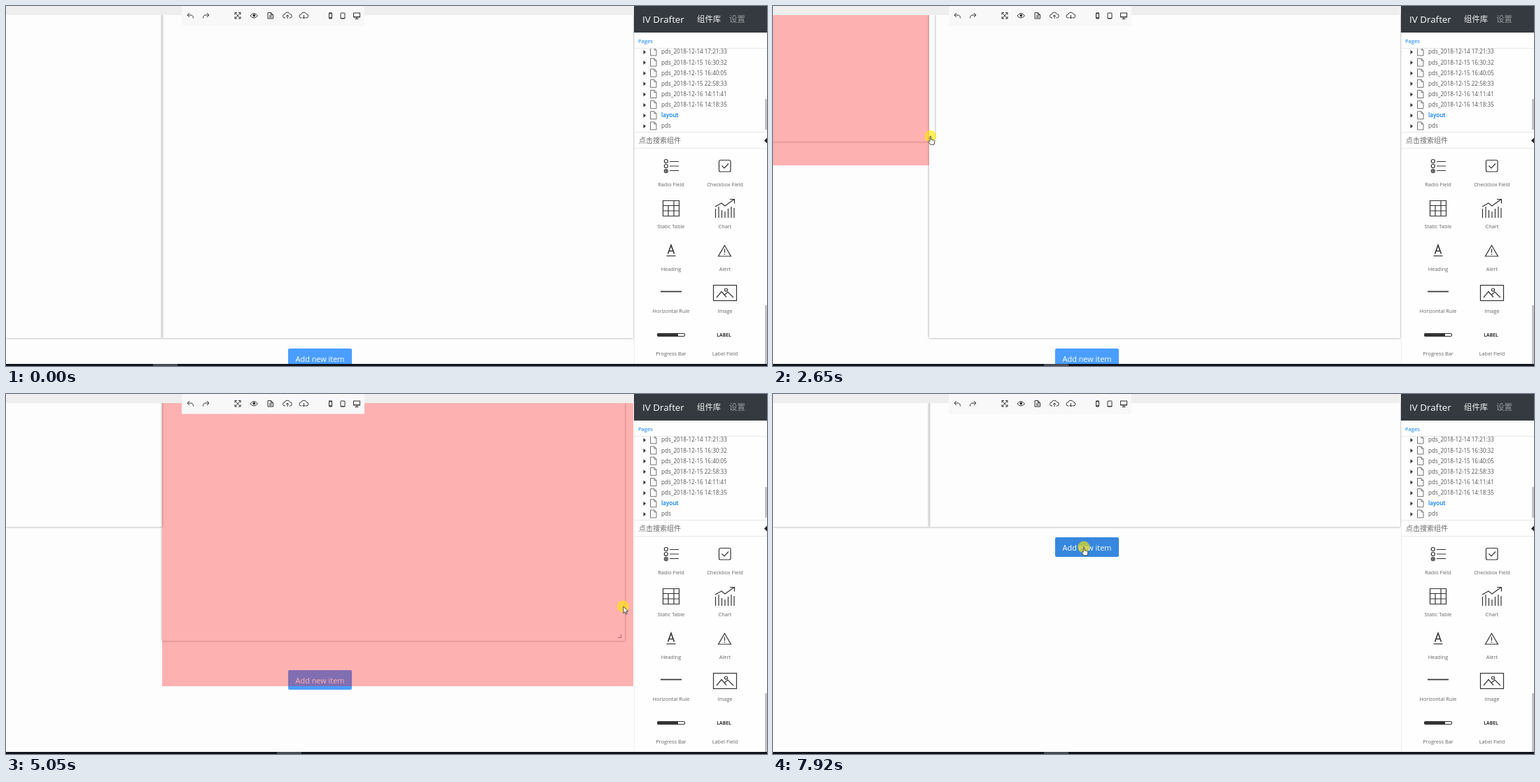
An HTML page for the animation above (7990 ms loop, 1087 by 515 pixels).

```html
<!DOCTYPE html>
<html lang="en">
<head>
<meta charset="utf-8">
<title>Page layout editor</title>
<style>
html, body { margin: 0; width: 100%; height: 100%; overflow: hidden; background: #fdfdfd; }
body { position: relative; font-family: "Open Sans", "Noto Sans CJK SC", "Noto Sans CJK", sans-serif; }
svg { position: absolute; left: 0; top: 0; }
#strip { position: absolute; width: 897px; height: 13px; background: #eee; }
#work { position: absolute; top: 13px; width: 897px; height: 499px; overflow: hidden; }
#work div { position: absolute; top: 0; box-sizing: border-box; }
#work .panel { top: -6px; box-shadow: 0 0 3px rgba(0,0,0,.42); }
#work .grip::after { content: ""; position: absolute; right: 5px; bottom: 4px; width: 5px; height: 5px;
  box-sizing: border-box; border: solid rgba(0,0,0,.45); border-width: 0 1px 1px 0; }
#left { left: 0; }
#right, #ghost { left: 223px; }
#work #button { left: 403px; width: 91px; height: 28.5px; border-radius: 2px; background: #4a9eff;
  color: #fff; font-size: 10.9px; line-height: 29px; text-align: center; white-space: nowrap; }
#work #ghost { background: rgba(255,0,0,.3); }
.line { fill: none; stroke: #343434; stroke-width: 1.2; }
.tool { fill: none; stroke: #333; stroke-width: 1; }
.cap { font-size: 7.4px; fill: #666; text-anchor: middle; }
.row { font-size: 8.1px; fill: #555; }
</style>
</head>
<body>
<div id="strip"></div>
<div id="work">
  <div id="left" class="panel"></div>
  <div id="right" class="panel"></div>
  <div id="button">Add new item</div>
  <div id="ghost"></div>
</div>

<svg width="1087" height="515">
  <rect x="251" width="261" height="28.5" fill="#f8f8f8"/>
  <g class="tool">
    <path d="M262 10l-3 3 3 3M259 13h5q3.500 0 3.500 4.500"/>
    <path d="M287 10l3 3-3 3M290 13h-5q-3.500 0-3.500 4.500"/>
    <path d="M327 12.500v-3h3M332 9.500h3v3M335 15v3h-3M330 18h-3v-3M327 9.500l8 8.500M335 9.500l-8 8.500"/>
    <path d="M349 14q5-7 10.500 0q-5.500 6-10.500 0z"/><circle cx="354.300" cy="13.500" r="1.500" fill="#333"/>
    <path d="M374 9.500h4.500l3 3v5.500h-7.500zM378.500 9.500v3h3M375.800 14h4M375.800 16h4"/>
    <g id="cloud"><path d="M399 17h-1a2.500 2.500 0 0 1 0-5a4 4 0 0 1 7.500-.5a2.700 2.700 0 0 1 0 5.500h-1"/></g>
    <use href="#cloud" x="23.500"/>
    <path d="M402 18v-5M400 15l2-2 2 2M425.500 13v5M423.500 16l2 2 2-2"/>
    <rect x="461.500" y="10" width="4" height="8" rx=".5"/><path d="M461 10.500h5M461 17h5" stroke-width="1.500"/>
    <rect x="478" y="10" width="6" height="8" rx=".5"/><path d="M478 17.500h6"/>
    <rect x="496.500" y="10" width="9" height="6"/><path d="M496 15.500h10M501 16v2.500M498.500 18.500h5"/>
  </g>

  <rect x="897" width="190" height="512" fill="#fefefe"/>
  <path d="M897.5 38V512" stroke="#eee"/>
  <rect x="897" width="190" height="38" fill="#343a40"/>
  <text x="909" y="24" font-size="13.400" fill="#fff">IV Drafter</text>
  <text x="987" y="23" font-size="11.400" fill="#f2f2f2">组件库</text>
  <text x="1033" y="23" font-size="11.400" fill="#999c9f">设置</text>
  <text x="903" y="53" font-size="7.600" fill="#007bff">Pages</text>
  <clipPath id="treeClip"><rect x="897" y="61" width="190" height="119"/></clipPath>
  <g id="tree" clip-path="url(#treeClip)"></g>
  <path d="M897 60.500h190M897 180.500h190M897 203.500h190" stroke="#e8e8e8"/>
  <text x="904" y="196" font-size="10" fill="#6a6a6a">点击搜索组件</text>
  <path d="M1083 192.500l4-4v8z" fill="#222"/>
  <path d="M1084 133h3v44h-3zM1084 428h3v84h-3z" fill="#c4c4c4"/>

  <g id="captions"></g>
  <g class="line">
    <path d="M948 222.500h13M948 229h13M948 235.500h13"/>
    <circle cx="942.800" cy="222" r="2.500"/><circle cx="942.800" cy="229" r="2.500"/><circle cx="942.800" cy="236" r="2.500"/>
    <circle cx="942.800" cy="236" r=".8"/>
    <rect x="1018.500" y="220.500" width="16.500" height="16.500" rx="2"/><path d="M1022.500 228.500l3.500 3.500 6-6.500"/>
    <path d="M938.500 278.500h23v22h-23zM938.500 285.500h23M938.500 293h23M946 285.500v15M954 278.500v22"/>
    <path d="M1013.500 303v-13M1018 303v-16M1022.500 303v-11M1027 303v-9M1031.500 303v-13M1036 303v-16M1040 303v-14"/>
    <path d="M1013 287l9-5 5 4 13-9.500M1034 276.500h6.500v6"/>
    <path d="M945.500 354.500l4.500-12.500 4.500 12.500M947 350.500h6" stroke-width="1.600"/><path d="M943.500 357.500h13"/>
    <path d="M1026.500 342.500l9 15.500h-18zM1026.500 347.500v5.500M1026.500 354.500v1.500"/>
    <path d="M935 408.500h30" stroke-width="1.700"/>
    <rect x="1010.500" y="399.500" width="33" height="22"/>
    <path d="M1015 417l7-8.500 7 8M1026 413.500l5-4.500 8 8"/><circle cx="1028.500" cy="406" r="2"/>
    <rect x="930.500" y="468.500" width="39" height="4" rx="1.500"/>
  </g>
  <path d="M931 468.500h29v4h-29z" fill="#343434"/>
  <text x="1025.500" y="473" font-size="6.700" font-weight="700" fill="#333" text-anchor="middle">LABEL</text>

  <rect y="512" width="1087" height="3" fill="#11141c"/>
  <rect id="task" y="512" width="35" height="3" fill="#474b52"/>

  <g id="pointer">
    <circle id="dot" r="8.500" fill="#ffe900" fill-opacity=".62"/>
    <g fill="#fff" stroke="#222" stroke-width=".8" stroke-linejoin="round">
      <path id="arrow" d="M.5 0v9.500l2.200-2 1.500 3.400 1.600-.7-1.500-3.300h3z"/>
      <path id="hand" d="M-.8 .8q.8-1.300 1.700 0v4l4 1q1.300.4 1 2l-.7 4.200h-5l-3.500-4.200q.5-1.500 2.500-.2z"/>
      <path id="resize" d="M-5-5h4l-1.300 1.300 5 5 1.300-1.300v4h-4l1.300-1.300-5-5-1.300 1.300z"/>
    </g>
  </g>
</svg>

<script>
const $ = id => document.getElementById(id);
const LOOP = 7990, START = 190, STEP = 78;
const ROW = 19, SHORT = 190, TALL = 475, SPLIT = 223, EDGE = 896;

const rows = ["pds_2018-12-14 17:21:33", "pds_2018-12-15 16:30:32", "pds_2018-12-15 16:40:05",
  "pds_2018-12-15 22:58:33", "pds_2018-12-16 14:11:41", "pds_2018-12-16 14:18:35", "layout", "pds"];
$("tree").innerHTML = rows.map((name, i) => {
  const style = name === "layout" ? 'style="fill:#007bff;font-weight:600"' : "";
  return `<g transform="translate(0 ${65.4 + i * 15.15})">
    <path d="M910.500 -2.500l3.500 3-3.500 3z" fill="#333"/>
    <path d="M920.500 -5.500h5.500l3 3v8h-8.500zM926 -5.500v3h3" fill="none" stroke="#666" stroke-width=".9"/>
    <text class="row" x="936" y="3" ${style}>${name}</text></g>`;
}).join("");

const captions = ["Radio Field", "Checkbox Field", "Static Table", "Chart", "Heading", "Alert",
  "Horizontal Rule", "Image", "Progress Bar", "Label Field"];
$("captions").innerHTML = captions.map((name, i) =>
  `<text class="cap" x="${i % 2 ? 1027 : 950}" y="${258 + (i >> 1) * 60.4}">${name}</text>`).join("");

// Pointer path: step, x, y
const path = [
  [0, 958, 498], [3, 600, 486], [6, 166, 470], [10, 215, 467], [13, 217, 468], [18, 217, 468],
  [20, 222, 452], [21, 225, 435], [22, 226, 415], [23, 228, 386], [24, 228, 341],
  [27, 227, 240], [30, 225, 187], [37, 224, 182], [38, 250, 200], [42, 838, 499],
  [49, 895, 472], [55, 896, 472], [56, 894, 463], [57, 893, 455], [58, 891, 440],
  [61, 884, 350], [64, 876, 212], [65, 875, 196], [66, 874, 181], [67, 873, 173],
  [73, 873, 174], [80, 867, 178], [83, 867, 178], [85, 867, 184], [89, 866, 184],
  [92, 700, 262], [95, 520, 260], [97, 446, 223], [99, 444, 219]
];

function pointer(n) {
  const i = path.findIndex(p => p[0] >= n);
  if (i < 1) return (i ? path[path.length - 1] : path[0]).slice(1);
  const [n0, x0, y0] = path[i - 1], [n1, x1, y1] = path[i];
  const k = (n - n0) / (n1 - n0);
  return [x0 + (x1 - x0) * k, y0 + (y1 - y0) * k];
}

// Panel edges trail the pointer by a step and settle after release.
function sizer(from, to, dx, dy, right) {
  const dragged = n => {
    const [x, y] = pointer(n - 1);
    return [x + dx, y + dy];
  };
  return n => {
    if (n <= from) return [right, TALL];
    if (n < to) return dragged(n);
    const [x, y] = dragged(to - 1), k = Math.min(1, (n - to + 1) / 3);
    return [x + (right - x) * k, y + (SHORT - y) * k];
  };
}
const leftSize = sizer(18, 38, 6, 7, SPLIT);
const rightSize = sizer(55, 89, 0, 3, EDGE);
const snap = y => SHORT + ROW * Math.max(0, Math.round((y - SHORT) / ROW));
const within = (n, a, b) => n >= a && n < b;
const show = (id, on) => { $(id).style.display = on ? "" : "none"; };

function setBox(id, [x, y], grip) {
  const el = $(id), x0 = id === "right" ? SPLIT : 0;
  el.style.width = x - x0 + "px";
  el.style.height = y - 13 + 6 + "px";
  el.classList.toggle("grip", grip);
}

function draw(t) {
  const n = Math.floor((t - START) / STEP);
  const leftDrag = within(n, 18, 38), rightDrag = within(n, 56, 89);

  setBox("left", leftSize(n), within(n, 10, 38));
  setBox("right", rightSize(n), within(n, 52, 89));

  show("ghost", leftDrag || rightDrag);
  const ghost = $("ghost").style, size = leftDrag ? leftSize : rightSize;
  ghost.left = (leftDrag ? 0 : SPLIT) + "px";
  ghost.width = (leftDrag ? SPLIT : EDGE - SPLIT) + "px";
  ghost.height = snap(size(n - 2)[1]) - 13 + "px";

  const button = $("button").style;
  button.top = snap(rightSize(n - 1)[1]) + 14.5 - 13 + "px";
  button.background = n >= 97 ? "#3787de" : "#4a9eff";

  $("task").setAttribute("x", n < 18 ? 210 : 387);

  const [x, y] = pointer(n);
  const hand = leftDrag || n >= 97;
  const resize = within(n, 10, 18) || within(n, 52, 56) || within(n, 73, 89);
  show("pointer", n >= 0);
  $("pointer").setAttribute("transform", `translate(${x} ${y})`);
  show("dot", within(n, 13, 38) || within(n, 55, 87) || n >= 99);
  show("hand", hand);
  show("resize", resize);
  show("arrow", !hand && !resize);
}

const begin = performance.now();
function tick() {
  draw((performance.now() - begin) % LOOP);
  requestAnimationFrame(tick);
}
tick();
</script>
</body>
</html>
```
